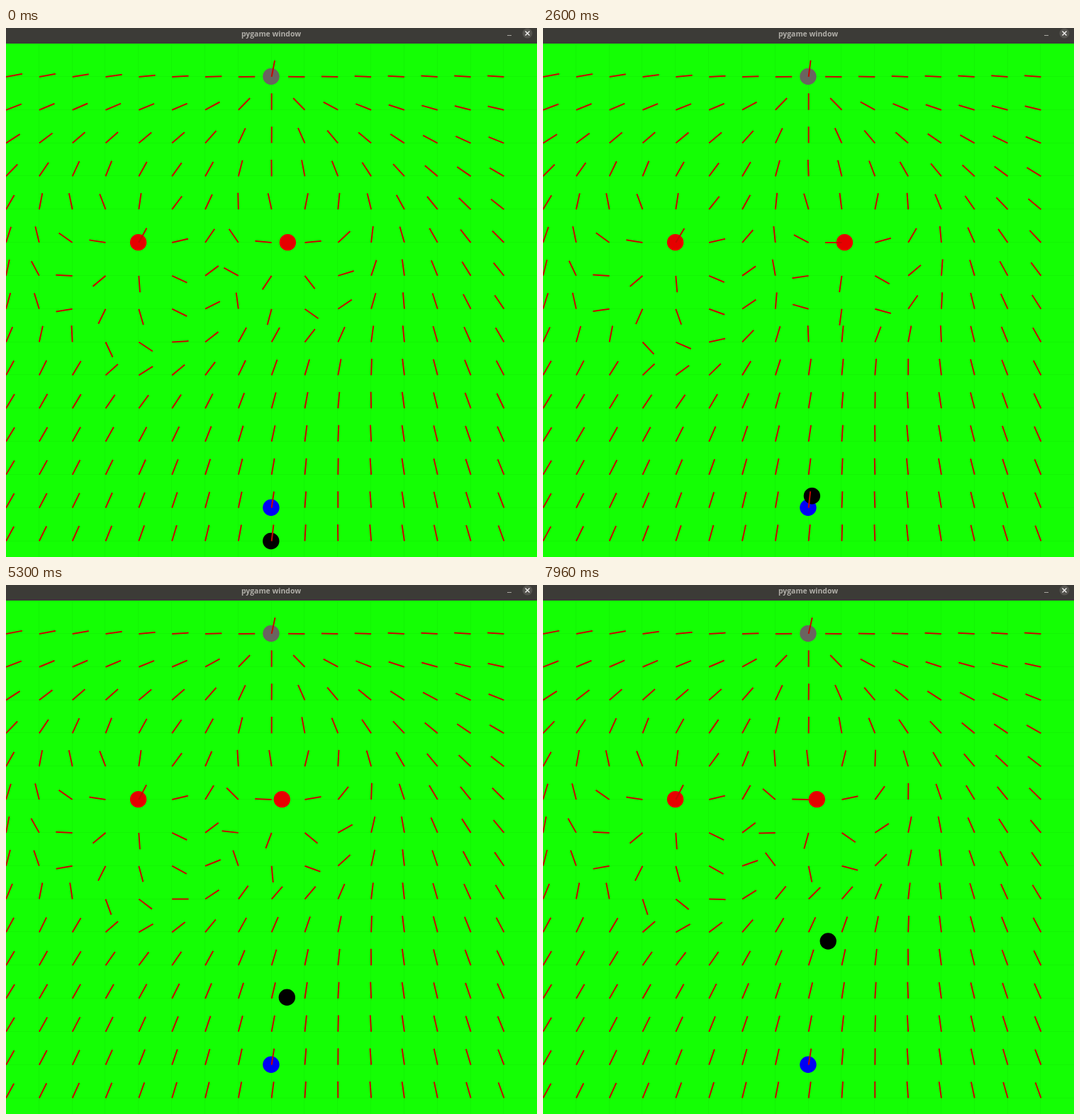
These frames come from a looping animation (749x747 px, 8000 ms). An HTML page:

```html
<!DOCTYPE html>
<html lang="en">
<head>
<meta charset="utf-8">
<title>Vector field</title>
<style>
  html, body { margin: 0; width: 100%; height: 100%; overflow: hidden; background: #14ff04; }
  svg { display: block; width: 100%; height: 100%; }
  text { font: bold 10.4px "Open Sans", sans-serif; fill: #b0aea8; }
</style>
</head>
<body>
<svg viewBox="0 0 749 747" preserveAspectRatio="none">
  <rect width="749" height="747" fill="#14ff04"/>
  <path id="grid" stroke="#12f504" fill="none"/>
  <rect width="749" height="22" fill="#3c3b37"/>
  <text x="374" y="12" text-anchor="middle">pygame window</text>
  <path d="M707 10.5h6" stroke="#a8a6a0"/>
  <circle cx="735.5" cy="7.5" r="7" fill="#55544f"/>
  <path d="M732.5 4.5l6 6m0-6l-6 6" stroke="#f4f3f0" stroke-width="1.4"/>
  <g id="discs"></g>
  <path id="field" stroke="#c60800" stroke-width="2" fill="none"/>
</svg>
<script>
const CELL = 46.83, TOP = 68.9, COLS = 16, ROWS = 15;
const LOOP = 8000, HOLD = 500, REPULSE = 0.1;
const goal = { x: 8, y: 0 }, fixed = { x: 4, y: 5 }, mover = { x: 8.5, y: 5 };

// simulation clock: step, obstacle phase in degrees, robot x, robot y
const keys = [
  [0, 0, 373.8, 724.5], [30, 96.2, 376.6, 685], [61, 212.9, 382, 638],
  [84, 285.5, 389.5, 609.3], [105, 353.4, 396.3, 582.2],
  [139, 467.6, 398.5, 536], [162, 549.1, 402.2, 503]
];

const $ = id => document.getElementById(id);
const px = x => x * CELL;
const py = y => TOP + y * CELL;

function disc(color) {
  const c = document.createElementNS("http://www.w3.org/2000/svg", "circle");
  c.setAttribute("r", 11.7);
  c.setAttribute("fill", color);
  $("discs").append(c);
  return c;
}

function place(c, x, y) {
  c.setAttribute("cx", x.toFixed(2));
  c.setAttribute("cy", y.toFixed(2));
}

const placeCell = (c, p) => place(c, px(p.x) - 0.7, py(p.y) - 0.4);

let grid = "";
for (let i = 1; i < COLS; i++) grid += `M${Math.round(px(i)) - 0.5} 22V747`;
for (let j = 0; j < ROWS; j++) grid += `M0 ${Math.round(py(j)) - 0.5}H749`;
$("grid").setAttribute("d", grid);

placeCell(disc("#6a6460"), goal);
placeCell(disc("#e60000"), fixed);
const moverDisc = disc("#e60000");
placeCell(disc("#0000f5"), { x: 8, y: 13 });
const robot = disc("#000");

// steps come in threes: 20, 20 and 100 ms long
function stepAt(t) {
  if (t < HOLD) return 0;
  const s = t - HOLD, r = s % 140;
  return Math.floor(s / 140) * 3 + 1 + (r < 20 ? 0 : r < 40 ? 1 : 2);
}

function sample(n) {
  let k = 1;
  while (k < keys.length - 1 && keys[k][0] < n) k++;
  const a = keys[k - 1], b = keys[k], f = (n - a[0]) / (b[0] - a[0]);
  return a.map((v, i) => v + (b[i] - v) * f);
}

// inverse square pull (q < 0) or push (q > 0)
function force(p, x, y, q) {
  const dx = x - p.x, dy = y - p.y, r = Math.hypot(dx, dy);
  return r < 1e-6 ? [0, 0] : [q * dx / r ** 3, q * dy / r ** 3];
}

function drawField() {
  let d = "";
  for (let j = 0; j < ROWS; j++) {
    for (let i = 0; i < COLS; i++) {
      const g = force(goal, i, j, -1);
      const a = force(fixed, i, j, REPULSE);
      const b = force(mover, i, j, REPULSE);
      const fx = g[0] + a[0] + b[0], fy = g[1] + a[1] + b[1];
      const s = CELL / 2 / (Math.hypot(fx, fy) || 1);
      d += `M${px(i).toFixed(2)} ${py(j).toFixed(2)}l${(fx * s).toFixed(2)} ${(fy * s).toFixed(2)}`;
    }
  }
  $("field").setAttribute("d", d);
}

let last = -1;
function render(t) {
  const n = stepAt(t % LOOP);
  if (n !== last) {
    last = n;
    const [, phase, x, y] = sample(n);
    mover.x = 8.5 + 1.5 * Math.sin(phase * Math.PI / 180);
    placeCell(moverDisc, mover);
    place(robot, x, y);
    drawField();
  }
}

const start = performance.now();
function loop() {
  render(performance.now() - start);
  requestAnimationFrame(loop);
}
loop();
</script>
</body>
</html>
```
